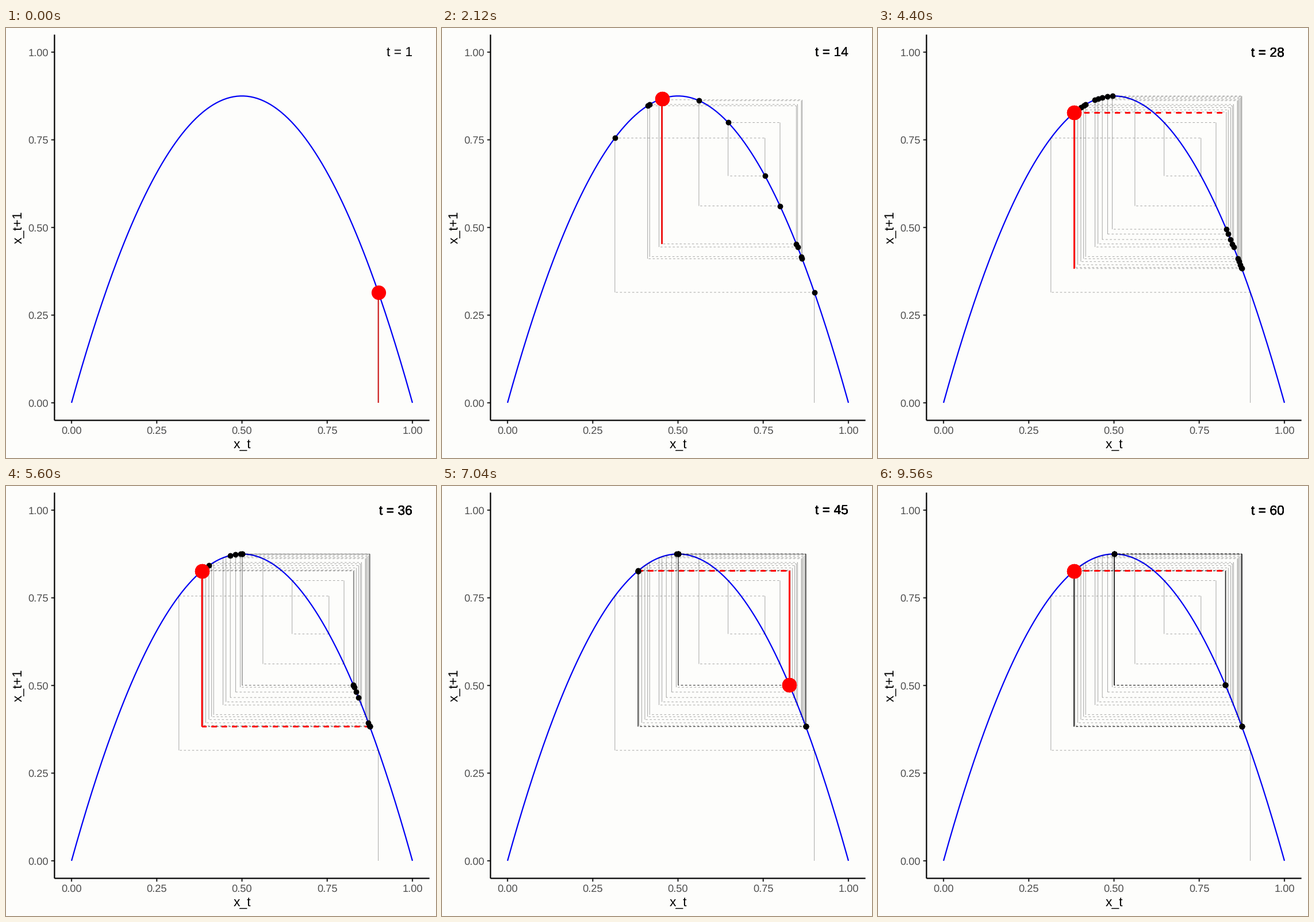
These frames come from a looping animation (748 by 748 pixels, 9.6 s). A matplotlib script:

```python
import numpy as np
import matplotlib.pyplot as plt
from matplotlib.animation import FuncAnimation
from matplotlib.collections import LineCollection

SIZE, DPI = 748, 64
PT = 72 / DPI              # points per pixel
STEPS, HOLD = 60, 4        # iterations, frames per iteration
TRAIL = 20                 # recent points kept as black dots
MAX_COPIES = 5
RATE = 3.5

plt.rcParams["font.family"] = "Liberation Sans"
plt.rcParams["text.hinting"] = "none"
plt.rcParams["path.snap"] = False


def logistic(x):
    return RATE * x * (1 - x)


def px(x):
    return 114 + 593 * x


def py(y):
    return 652 - 610 * y


orbit = [0.9]
for _ in range(STEPS):
    orbit.append(logistic(orbit[-1]))
orbit = np.array(orbit)
dot_x, dot_y = px(orbit[:-1]), py(orbit[1:])

# Cobweb pieces: up or down to the curve, then across to the diagonal
starts = np.append(0, orbit[1:-1])
rises = [[(px(x), py(a)), (px(x), py(b))]
         for x, a, b in zip(orbit, starts, orbit[1:])]
runs = [[(px(x), py(b)), (px(b), py(b))]
        for x, b in zip(orbit, orbit[1:])]

fig = plt.figure(figsize=(SIZE / DPI, SIZE / DPI), dpi=DPI, facecolor="#fdfdfb")
ax = fig.add_axes([0, 0, 1, 1])
ax.set_xlim(0, SIZE)
ax.set_ylim(SIZE, 0)
ax.axis("off")


def line(xs, ys, color, width=2.22, z=1):
    ax.plot(xs, ys, color=color, lw=width * PT, zorder=z,
            solid_capstyle="butt")


def text(x, y, s, size, color="black", ha="center", **kw):
    return ax.text(x, y, s, fontsize=size * PT, color=color, ha=ha,
                   va="baseline", **kw)


def segments(color, width, z, style="-", **kw):
    coll = LineCollection([], colors=color, linewidths=width * PT,
                          linestyles=style, zorder=z, **kw)
    ax.add_collection(coll, autolim=False)
    return coll


def markers(color, diameter, z):
    return ax.plot([], [], "o", color=color, ms=diameter * PT, mew=0,
                   zorder=z)[0]


# Axes
left, right, top, bottom = px(-0.05), px(1.05), py(1.05), py(-0.05)
line([left, left], [top, bottom], "black", z=3)
line([left, right], [bottom, bottom], "black", z=3)
for v in np.linspace(0, 1, 5):
    line([px(v)] * 2, [bottom, bottom + 5.7], "#333333", z=2)
    line([left - 5.7, left], [py(v)] * 2, "#333333", z=2)
    text(px(v), 705.7, f"{v:.2f}", 18.3, "#4d4d4d")
    text(74, py(v) + 6.5, f"{v:.2f}", 18.3, "#4d4d4d", ha="right")
text(410.5, 731.7, "x_t", 22.9)
text(27.9, 347, "x_t+1", 22.9, rotation=90, rotation_mode="anchor")

# Parabola
grid = np.linspace(0, 1, 201)
line(px(grid), py(logistic(grid)), "#0000f5", z=4)

DASH = (0, (4, 4))
old_rises = segments("black", 0.89, 5, alpha=0.38)
old_runs = segments("black", 0.89, 5, DASH, alpha=0.38)
red_run = segments("red", 2.22, 6, DASH)
red_rise = segments("red", 2.22, 6)
dots = markers("black", 9.8, 7)
head = markers("red", 25.2, 8)
labels = [text(707, 50, "", 22.9, ha="right", zorder=9)
          for _ in range(MAX_COPIES)]


def draw(frame):
    k, phase = divmod(frame, HOLD)
    mix = min(k / 20, 1)
    red = (0.8 + 0.2 * mix, 0.12 * (1 - mix), 0.12 * (1 - mix))
    # Stacked copies make the current marks heavier as the counter climbs
    copies = min(1 + k // 5, MAX_COPIES)

    old_rises.set_segments(rises[:k + (phase == 3)])
    old_runs.set_segments(runs[:k])
    red_rise.set_segments([rises[k]] * copies if phase < 3 else [])
    if phase == 0:
        run = runs[k - 1:k] if k else []
    else:
        run = [runs[k]] if phase >= 2 else []
    red_run.set_segments(run * copies)
    red_rise.set_color(red)
    red_run.set_color(red)

    recent = slice(max(0, k - TRAIL), k)
    dots.set_data(dot_x[recent], dot_y[recent])
    head.set_data([dot_x[k]] * copies, [dot_y[k]] * copies)

    for i, label in enumerate(labels):
        label.set_text(f"t = {k + 1}" if i < copies else "")
    return []


anim = FuncAnimation(fig, draw, frames=STEPS * HOLD, interval=40,
                     init_func=lambda: draw(0), repeat=True, repeat_delay=0,
                     blit=False)
plt.show()
```
